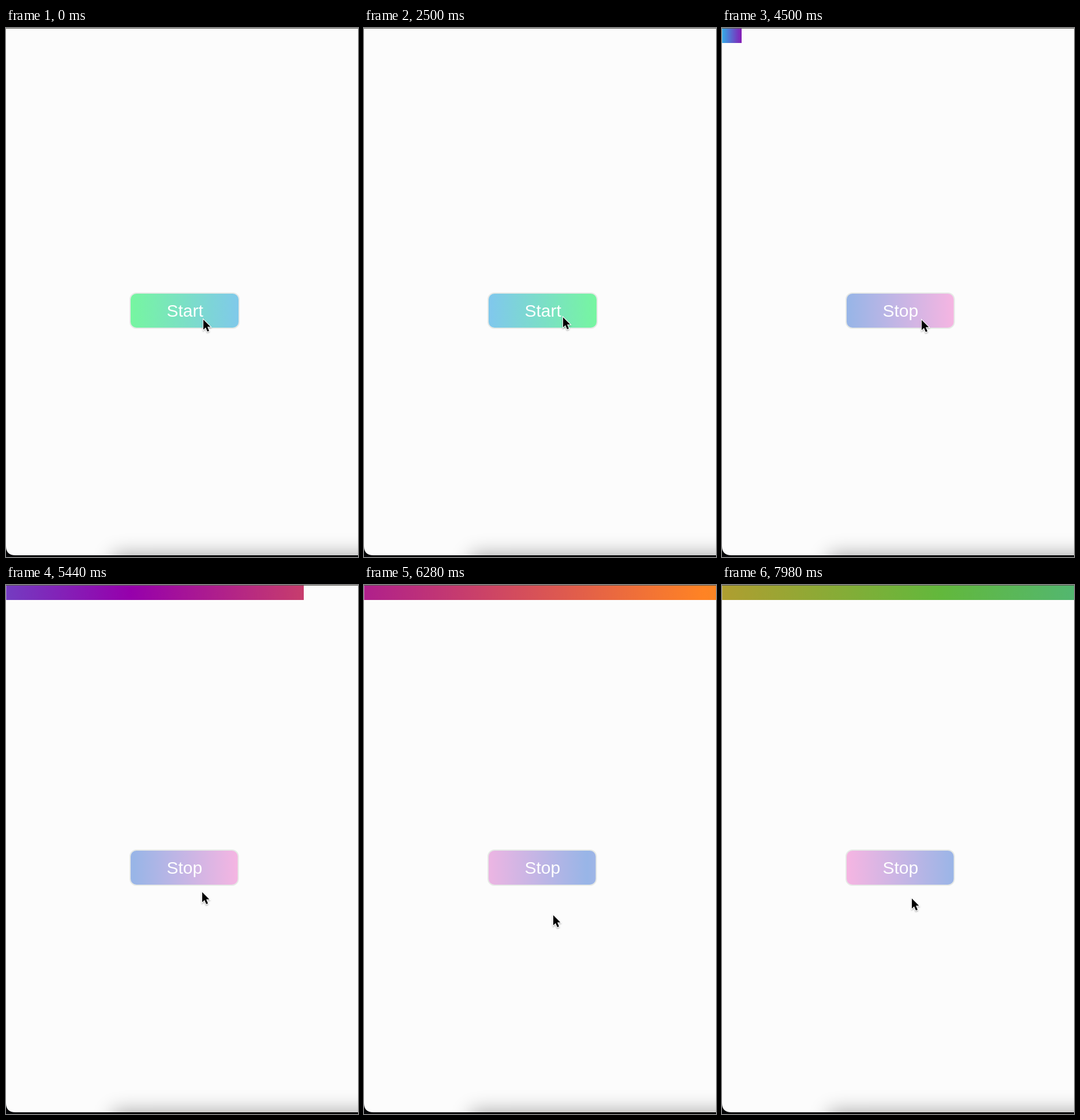
Write an HTML page that moves like this. It is 610 px wide and 918 px high and loops after 8000 ms.

```html
<!DOCTYPE html>
<html lang="en">
<head>
<meta charset="utf-8">
<title>Start / Stop progress</title>
<style>
  html, body { margin: 0; width: 100%; height: 100%; overflow: hidden; background: #fcfcfc; }
  svg { display: block; width: 100vw; height: 100vh; }
  text { font: 30px "Liberation Sans", Arial, sans-serif; fill: #fff; }
</style>
</head>
<body>
<svg viewBox="0 0 610 918">
  <defs>
    <linearGradient id="btnFill" gradientUnits="userSpaceOnUse">
      <stop class="edge"/><stop class="mid" offset=".51"/><stop class="edge" offset="1"/>
    </linearGradient>
    <linearGradient id="barFill" gradientUnits="userSpaceOnUse">
      <stop stop-color="#2fb4ea"/>
      <stop offset=".25" stop-color="#9600ac"/>
      <stop offset=".5" stop-color="#ff8324"/>
      <stop offset=".75" stop-color="#62b83c"/>
      <stop offset="1" stop-color="#2fb4ea"/>
    </linearGradient>
    <filter id="soft" x="-20%" y="-100%" width="140%" height="300%">
      <feGaussianBlur stdDeviation="17"/>
    </filter>
    <filter id="lift" x="-50%" y="-50%" width="200%" height="200%">
      <feDropShadow dx="0" dy="1.5" stdDeviation="1.3" flood-opacity=".35"/>
    </filter>
    <clipPath id="page"><path d="M0 0H610V915H16Q0 915 0 899Z"/></clipPath>
  </defs>
  <rect width="610" height="918" fill="#040507"/>
  <g clip-path="url(#page)">
    <rect width="610" height="918" fill="#fcfcfc"/>
    <rect x="185" y="913" width="600" height="80" opacity=".34" filter="url(#soft)"/>
  </g>
  <g id="bar">
    <rect id="barRect" y="1" height="25" fill="url(#barFill)"/>
    <rect y="1" width="1" height="25" fill="#fff" opacity=".3"/>
  </g>
  <rect width="610" height="1" fill="#55564e"/>
  <rect id="button" x="215" y="460" height="61" rx="11" fill="url(#btnFill)" stroke="#e6e9e6" stroke-width="2"/>
  <text id="label" x="278.4" y="500.5"></text>
  <path id="cursor" filter="url(#lift)" d="M0 0V17.5L4 13.8L7 20.8L10 19.5L7 12.6H12.4Z"
        stroke="#fff" stroke-width="2" paint-order="stroke"/>
</svg>
<script>
const LOOP = 8000;
const CLICK = 95.66;   // the tick at which Start becomes Stop
const LEAVE = 115.5;   // the pointer leaves the button
const FULL = 620;
const MOUSE = [
  [0, 342, 506], [14, 342, 505], [53, 345, 502], [75, 346, 506], [104, 346, 507],
  [110, 344, 515], [116, 340, 533], [127, 328, 573], [160, 328, 573], [171, 329, 544]
];
const SHIFT = [[CLICK, 0], [116, .833], [134, 1.55], [152, 2.339], [171, 3.137]];

const el = id => document.getElementById(id);
const set = (node, attrs) => {
  for (const name in attrs) node.setAttribute(name, attrs[name]);
};
const clamp = x => Math.min(1, Math.max(0, x));

function tickAt(ms) {
  const rest = ms % 140;
  return 3 * Math.floor(ms / 140) + (rest < 20 ? 0 : rest < 120 ? 1 : 2);
}

function track(keys, t) {
  let i = 1;
  while (i < keys.length - 1 && t > keys[i][0]) i++;
  const [a, b] = [keys[i - 1], keys[i]];
  const k = clamp((t - a[0]) / (b[0] - a[0]));
  return a.slice(1).map((v, j) => v + (b[j + 1] - v) * k);
}

// CSS "ease": cubic-bezier(.25, .1, .25, 1)
function ease(x) {
  if (x <= 0 || x >= 1) return clamp(x);
  let lo = 0, hi = 1, u;
  for (let i = 0; i < 24; i++) {
    u = (lo + hi) / 2;
    const bx = .75 * u * (1 - u) + u ** 3;
    if (bx < x) lo = u; else hi = u;
  }
  return .3 * u * (1 - u) ** 2 + 3 * u * u * (1 - u) + u ** 3;
}

function drawButton(t) {
  const running = t >= CLICK;
  const hover = t < LEAVE ? ease(t / 30) : 1 - ease((t - LEAVE) / 30);
  const width = running ? 187.5 : 189;
  const left = 215 - hover * width;
  set(el("button"), { width });
  set(el("btnFill"), { x1: left, x2: left + 2 * width });
  const [edge, mid] = running ? ["#f6b5e2", "#98b5e7"] : ["#76f6a0", "#80c8ec"];
  document.querySelectorAll(".edge").forEach(s => set(s, { "stop-color": edge }));
  set(document.querySelector(".mid"), { "stop-color": mid });
  el("label").textContent = running ? "Stop" : "Start";
}

function drawBar(t) {
  const width = Math.min(FULL, Math.max(0, (t - CLICK) * 25.37));
  const left = -track(SHIFT, t)[0] * width;
  set(el("bar"), { visibility: width ? "visible" : "hidden" });
  set(el("barRect"), { width });
  set(el("barFill"), { x1: left, x2: left + 5 * width });
}

function render(ms) {
  const t = tickAt(ms);
  drawButton(t);
  drawBar(t);
  const [x, y] = track(MOUSE, t);
  set(el("cursor"), { transform: `translate(${x} ${y})` });
}

const start = performance.now();
function loop() {
  render((performance.now() - start) % LOOP);
  requestAnimationFrame(loop);
}
loop();
</script>
</body>
</html>
```
